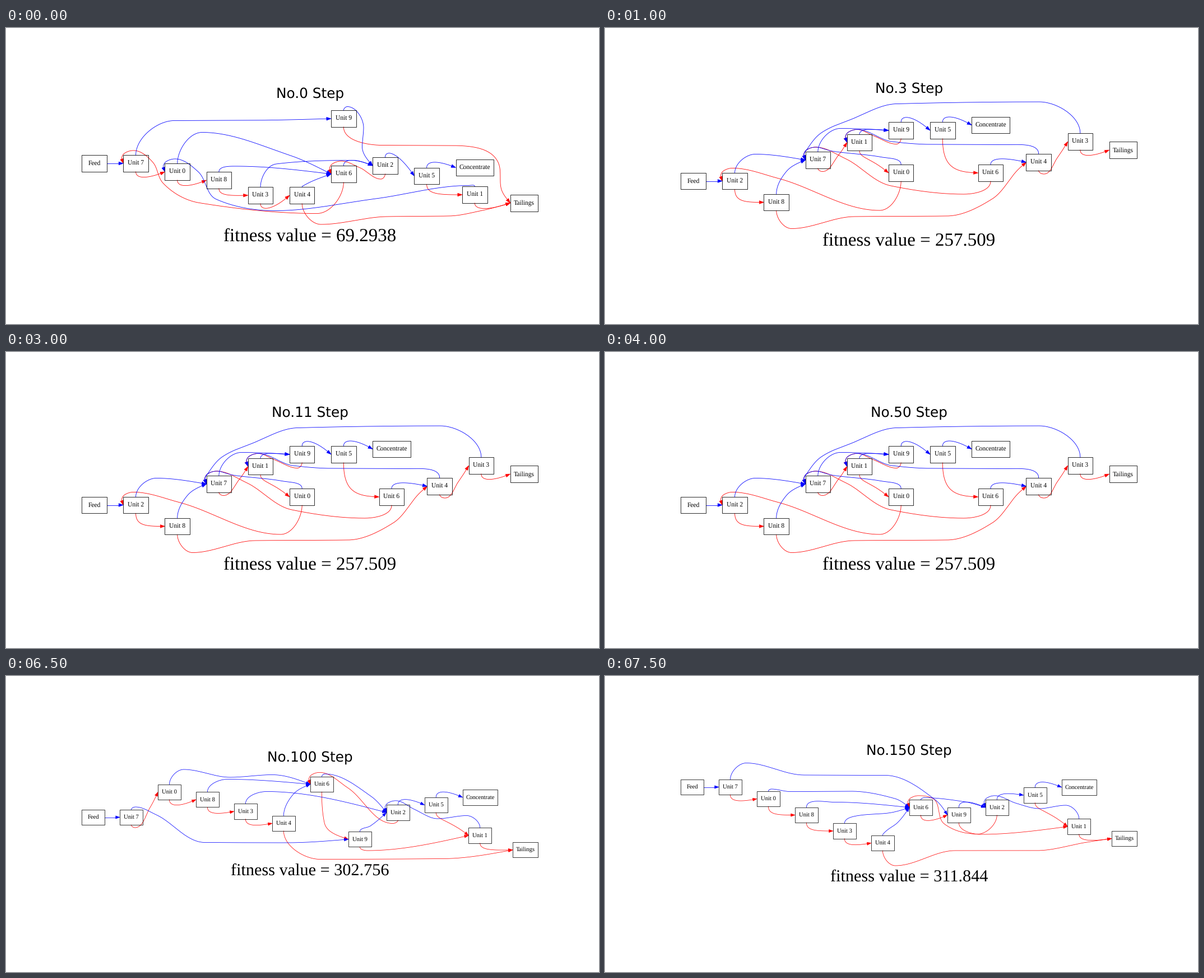
A matplotlib script that plays this animation: 1058x529 px, repeating every 8 s.

```python
import numpy as np
import matplotlib.pyplot as plt
from matplotlib.animation import FuncAnimation
from matplotlib.patches import Polygon, Rectangle

W, H, DPI = 1058, 529, 100
PX = 72 / DPI  # one pixel in points
LEFT, SPAN = 135.2, 814
NODE_W, NODE_H, GAP = 54, 36, 36
BLUE, RED = "#0000ff", "#ff0000"
NAMES = {"F": "Feed", "C": "Concentrate", "T": "Tailings"}
WIDTHS = {"C": 82, "T": 60}

plt.rcParams["text.hinting"] = "none"
fig = plt.figure(figsize=(W / DPI, H / DPI), dpi=DPI, facecolor="white")
ax = fig.add_axes([0, 0, 1, 1])
ax.set(xlim=(0, W), ylim=(H, 0))
ax.axis("off")

T = np.linspace(0, 1, 60)[:, None]


def width(key):
    return WIDTHS.get(key, NODE_W)


def bezier(a, b, c, d):
    a, b, c, d = (np.array(p, float) for p in (a, b, c, d))
    return (1 - T)**3 * a + 3 * T * (1 - T)**2 * b + 3 * T**2 * (1 - T) * c + T**3 * d


def smooth(points, start_dir):
    """Curve through the points that turns flat or upright at each extreme."""
    p = np.array(points, float)
    h = np.hypot(*np.diff(p, axis=0).T)
    slope = np.diff(p, axis=0) / h[:, None]
    dirs = [np.array(start_dir, float)]
    for s, t in zip(slope[:-1], slope[1:]):
        d = np.where(s * t > 0, 2 * s * t / (s + t + 1e-9), 0)
        if not d.any():
            d = s + t
        dirs.append(d / np.hypot(*d))
    dirs.append(1.5 * slope[-1] - 0.5 * dirs[-1])
    return np.vstack([bezier(p[i], p[i] + dirs[i] * n / 3, p[i + 1] - dirs[i + 1] * n / 3, p[i + 1])
                      for i, n in enumerate(h)])


class Graph:
    """Columns of nodes from left to right, scaled to a fixed span."""

    def __init__(self, title_y, value_y, columns, ys):
        self.title_y, self.value_y = title_y, value_y
        columns = columns.split()
        widths = [max(map(width, col)) for col in columns]
        self.k = k = SPAN / (sum(widths) + GAP * (len(columns) - 1))
        self.lw = k * PX
        self.artists, self.nodes = [], {}
        x, ys = LEFT, iter(ys)
        for col, w in zip(columns, widths):
            for key in col:
                self.add_node(key, x + w * k / 2, next(ys))
            x += (w + GAP) * k
        fx, fy = self.nodes["F"]
        self.arrow(np.linspace((fx + NODE_W * k / 2, fy), self.west(columns[1]), 60), BLUE)

    def add_node(self, key, x, y):
        k = self.k
        w, h = width(key) * k, NODE_H * k
        self.nodes[key] = x, y
        self.artists += [
            ax.add_patch(Rectangle((x - w / 2, y - h / 2), w, h, fill=False,
                                   ec="black", lw=self.lw, zorder=3)),
            ax.text(x, y + 3.8 * k, NAMES.get(key, f"Unit {key}"), ha="center", va="baseline",
                    family="Liberation Serif", size=14 * k * PX, zorder=4)]

    def west(self, key):
        x, y = self.nodes[key]
        return x - width(key) * self.k / 2, y

    def arrow(self, path, color):
        tip, size = path[-1], 10 * self.k
        last = np.nonzero(np.hypot(*(path - tip).T) > size)[0][-1]
        u = tip - path[last]
        u /= np.hypot(*u)
        base, side = tip - size * u, 0.35 * size * np.array([-u[1], u[0]])
        z = 2 if color == BLUE else 1
        self.artists += ax.plot(*np.vstack([path[:last + 1], base]).T,
                                color=color, lw=self.lw, zorder=z)
        self.artists.append(ax.add_patch(Polygon([tip, base + side, base - side], fc=color,
                                                 ec=color, lw=0.6 * self.lw, zorder=z)))

    def ends(self, a, b, color):
        """Blue leaves the top of a node, red the bottom; both enter from the west."""
        sign = -1 if color == BLUE else 1
        x, y = self.nodes[a]
        return sign, (x, y + sign * NODE_H / 2 * self.k), self.west(b)

    def hops(self, color, pairs):
        for a, b in pairs.split():
            sign, (x, y), tip = self.ends(a, b, color)
            depth = sign * (tip[1] - y)
            bend = y + sign * (depth if 13 < depth < 30 else 13)
            self.arrow(bezier((x, y), (x, bend), (x + 0.4 * (tip[0] - x), bend), tip), color)

    def edge(self, color, pair, *via):
        sign, start, tip = self.ends(*pair, color)
        points = [start, *via]
        if tip[0] < start[0]:  # an edge going back hooks over the corner of its node
            hook = [(tip[0] + dx * self.k, tip[1] + dy * self.k)
                    for dx, dy in ((22, -28), (2.5, -22), (-3.5, -11))]
            points += hook[1:] if via[-1][1] < hook[0][1] else hook
        self.arrow(smooth([*points, tip], (0, sign)), color)

    def blue(self, pair, *via):
        self.edge(BLUE, pair, *via)

    def red(self, pair, *via):
        self.edge(RED, pair, *via)

    def show(self, on):
        for artist in self.artists:
            artist.set_visible(on)


first = Graph(125, 380.8, "F 7 0 8 3 4 69 2 5 1C T",
              [242, 242, 257, 272, 299, 299, 261, 162, 246, 264.5, 298, 249.5, 312.7])
first.hops(BLUE, "62 25 5C")
first.hops(RED, "70 08 83 34 51 1T")
first.blue("79", (300, 165.5), (440, 165))
first.blue("06", (350, 186.5), (505, 227))
first.blue("86", (410, 247))
first.blue("32", (482, 243), (618, 236.5))
first.blue("46", (532, 281))
first.blue("92", (609, 140.5), (638, 178), (635.5, 212))
first.blue("10", (825, 281.5), (660, 305), (480, 326.5), (375, 306), (343, 257))
first.red("4T", (562, 351), (680, 337), (790, 336), (850, 326))
first.red("67", (555, 331.5), (345, 312.5), (280, 277), (262, 240))
first.red("9T", (670, 209.5), (770, 210), (878, 240), (883, 285))
first.red("26", (669, 270), (632, 250))

second = Graph(116, 388.8, "F 2 8 7 1 90 5 C6 4 3 T",
               [273.5, 273.5, 311.5, 236, 204.5, 183, 259, 183, 173.5, 259, 240, 203, 218])
second.hops(BLUE, "95 5C 64")
second.hops(RED, "28 10 3T")
second.blue("27", (268, 225.5))
second.blue("87", (324, 256))
second.blue("79", (420, 179.5))
second.blue("19", (470, 181))
second.blue("07", (495, 231), (405, 220))
second.blue("41", (715, 208.5), (580, 208), (512, 203))
second.blue("37", (775, 132), (520, 135.5), (440, 163), (385, 188))
second.red("84", (333, 358.5), (445, 337), (610, 336), (690, 306), (737, 253))
second.red("71", (388, 256.5), (416, 228))
second.red("91", (520, 207.5), (480, 193))
second.red("02", (490, 326), (310, 269))
second.red("56", (617, 246))
second.red("67", (640, 297), (510, 282), (430, 234))
second.red("43", (783, 261), (807, 232))

third = Graph(153, 355.4, "F 7 0 8 3 4 6 9 2 5 1C T",
              [252.5, 252.5, 207.3, 220.8, 242, 263.3, 193.5, 291.8, 244, 230.5, 285, 217, 310.8])
third.hops(BLUE, "25 5C")
third.hops(RED, "08 83 34 51 1T")
third.blue("79", (231, 234), (268, 248), (355, 297.5), (500, 298))
third.blue("06", (317, 167), (400, 181), (475, 176.5))
third.blue("86", (395, 184.5))
third.blue("32", (465, 206.5))
third.blue("46", (512, 212))
third.blue("62", (569, 175), (650, 214))
third.blue("92", (650, 268))
third.blue("12", (822, 249.5), (770, 255), (730, 239))
third.red("70", (230, 271), (257, 235))
third.red("4T", (560, 327.5), (780, 326.5))
third.red("69", (568, 262))
third.red("91", (645, 312))
third.red("26", (690, 263.5), (610, 200))

fourth = Graph(141, 366.8, "F 7 0 8 3 4 6 9 2 5 1C T",
               [198.5, 198.5, 219.5, 248.5, 277, 298.5, 235, 248.5, 235, 213, 269, 199, 290.5])
fourth.hops(BLUE, "92 25 5C")
fourth.hops(RED, "70 08 83 34 69 51 1T")
fourth.blue("79", (252, 155.5), (355, 177), (500, 177.5), (590, 222))
fourth.blue("06", (297, 202), (330, 206.5), (440, 206), (517, 219))
fourth.blue("86", (410, 225.5))
fourth.blue("36", (455, 249), (505, 245))
fourth.blue("46", (500, 278.5), (522, 262))
fourth.blue("62", (570, 217.5), (640, 224.5))
fourth.blue("12", (822, 231), (775, 237), (735, 228))
fourth.red("4T", (518, 339), (625, 312), (770, 312), (860, 297))
fourth.red("91", (670, 283))
fourth.red("26", (665, 282.5), (605, 264), (585, 219))

graphs = [first, second, third, fourth]
title = ax.text(542.5, 0, "", ha="center", va="baseline", family="DejaVu Sans", size=24.8 * PX)
value = ax.text(542.3, 0, "", ha="center", va="baseline", family="Liberation Serif")

STEPS = [0, *range(1, 12, 2), 25, *range(50, 101, 10), 120, 150]


def state(step):
    if step < 3:
        return first, "69.2938" if step == 0 else "257.509"
    if step < 100:
        return second, "257.509"
    if step < 150:
        return third, "302.756"
    return fourth, "311.844"


def update(i):
    graph, fitness = state(STEPS[i])
    for g in graphs:
        g.show(g is graph)
    title.set_text(f"No.{STEPS[i]} Step")
    title.set_y(graph.title_y)
    value.set_text(f"fitness value = {fitness}")
    value.set_y(graph.value_y)
    value.set_fontsize(40 * graph.k * PX)
    return [title, value]


anim = FuncAnimation(fig, update, frames=len(STEPS), interval=500, repeat=True,
                     repeat_delay=0, blit=False)
plt.show()
```
